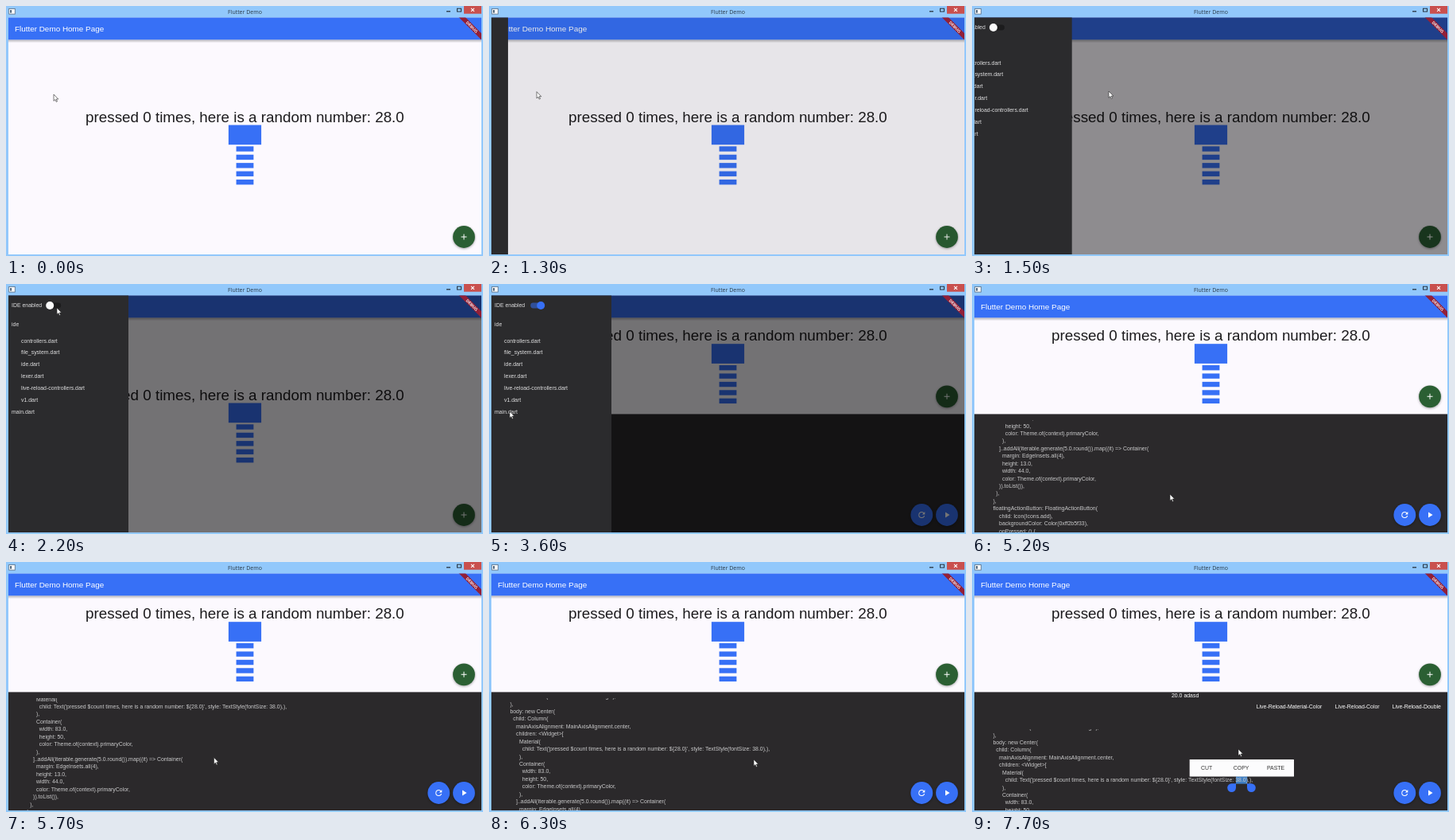
Recreate the animation shown at these times as an HTML page. Size 600 px wide and 314 px high, loop 8 s.

```html
<!DOCTYPE html>
<html lang="en">
<head>
<meta charset="utf-8">
<title>Flutter Demo</title>
<style>
  html, body { margin: 0; width: 100%; height: 100%; overflow: hidden; background: #92c8fb; }
  svg { display: block; width: 100%; height: 100%; }
  text { font: 6.93px "Liberation Sans", Arial, sans-serif; white-space: pre; }
  .code text { fill: #cacacb; }
  .drawer text { fill: #dededf; }
  .bar text { fill: #fff; }
  .menu text { fill: #333; }
  .fab { filter: drop-shadow(0 1.5px 1.5px rgba(0, 0, 0, .35)); }
</style>
</head>
<body>
<svg viewBox="0 0 600 314">
  <defs>
    <clipPath id="client"><rect x="3" y="14.5" width="595" height="297.5"/></clipPath>
    <clipPath id="editor"><rect id="editorView" x="3" y="171" width="595" height="141"/></clipPath>
    <linearGradient id="shade" x2="0" y2="1">
      <stop offset="0" stop-opacity=".28"/><stop offset="1" stop-opacity="0"/>
    </linearGradient>
  </defs>

  <rect width="600" height="314" fill="#92c8fb"/>
  <rect x="3.7" y="3.5" width="7.6" height="6.6" fill="#fff" stroke="#566b80" stroke-width=".8"/>
  <rect x="5" y="5" width="2.2" height="3.6" fill="#566b80"/>
  <text x="300.5" y="9.8" text-anchor="middle" fill="#2b3a48" style="font:7px 'Open Sans',sans-serif">Flutter Demo</text>
  <path d="M554 6.8h5" stroke="#26323e" stroke-width="1.3"/>
  <rect x="567.5" y="3.2" width="5" height="3.8" fill="none" stroke="#26323e"/>
  <rect x="576" width="22" height="9.7" fill="#c9504e"/>
  <path d="M585 2.8l4 4m0-4l-4 4" stroke="#fff" stroke-width="1.1"/>

  <g clip-path="url(#client)">
    <rect x="3" y="14" width="595" height="298" fill="#fcf9fe"/>
    <g id="content">
      <text x="100" y="145.6" fill="#1c1b1d" style="font-size:18.84px">pressed 0 times, here is a random number: 28.0</text>
      <g id="blocks" fill="#3770f6"><rect x="279.9" y="149.5" width="41.2" height="24.7"/></g>
    </g>
    <rect x="3" y="42.3" width="595" height="4" fill="url(#shade)"/>
    <rect x="3" y="14" width="595" height="28.3" fill="#3770f6"/>
    <text x="10.9" y="32.2" fill="#fff" style="font-size:9.92px">Flutter Demo Home Page</text>

    <g id="panel">
      <rect x="3" y="163.4" width="595" height="149" fill="#2b292b"/>
      <g id="bar" class="bar">
        <text x="251" y="170.3">20.0 adasd</text>
        <text x="357.7" y="183.8">Live-Reload-Material-Color</text>
        <text x="456.8" y="183.8">Live-Reload-Color</text>
        <text x="528.7" y="183.8">Live-Reload-Double</text>
      </g>
      <g id="highlight"><rect x="332" y="230.2" width="14.2" height="9.4" fill="#3f7fc4"/></g>
      <g clip-path="url(#editor)"><g id="code" class="code"></g></g>
      <g id="handles" fill="#3770f6">
        <path d="M332 239.2v5.4a5.4 5.4 0 1 1-5.4-5.4z"/>
        <path d="M346 239.2v5.4a5.4 5.4 0 1 0 5.4-5.4z"/>
      </g>
      <g id="menu" class="menu">
        <rect x="273.7" y="209" width="131.3" height="21.6" rx=".6" fill="#fcfcfd"/>
        <text x="288" y="222.3">CUT</text>
        <text x="328.8" y="222.3">COPY</text>
        <text x="371" y="222.3">PASTE</text>
      </g>
      <g id="tools"></g>
    </g>
    <g id="add"></g>

    <rect id="scrim" x="3" y="14" width="595" height="298"/>
    <g id="drawer" class="drawer">
      <rect x="3" y="14" width="151" height="298" fill="#2b2b2d"/>
      <text x="7" y="29.3">IDE enabled</text>
      <rect id="track" x="52.2" y="23.5" width="17" height="6.9" rx="3.45"/>
      <circle id="thumb" cy="27" r="5"/>
    </g>
    <g transform="translate(598 14.5) rotate(45)">
      <rect x="-22" y="13.9" width="44" height="5.95" fill="#922038"/>
      <text y="18.7" text-anchor="middle" fill="#fff" style="font-size:5.06px;font-weight:bold">DEBUG</text>
    </g>
  </g>
  <path id="cursor" d="M0 0v8.3l1.9-1.8 1.3 2.9 1.3-.6-1.3-2.8h2.6z" fill="#fff" stroke="#222" stroke-width=".6"/>
</svg>

<script>
const LOOP = 8000, STEP = 100, LINE = 9.43;
const $ = id => document.getElementById(id);

const source = `}

class MyHomePage extends StatefulWidget {
  MyHomePage({Key key}) : super(key: key);

  @override
  _MyHomePageState createState() => new _MyHomePageState();
}

class _MyHomePageState extends State<MyHomePage> {
  int count = 0;

  @override
  Widget build(BuildContext context) {
    return new Scaffold(
        appBar: new AppBar(
          title: new Text('Flutter Demo Home Page'),
        ),
        body: new Center(
          child: Column(
            mainAxisAlignment: MainAxisAlignment.center,
            children: <Widget>[
              Material(
                child: Text('pressed $count times, here is a random number: \${28.0}', style: TextStyle(fontSize: 38.0),),
              ),
              Container(
                width: 83.0,
                height: 50,
                color: Theme.of(context).primaryColor,
              ),
            ]..addAll(Iterable.generate(5.0.round()).map((it) => Container(
              margin: EdgeInsets.all(4),
              height: 13.0,
              width: 44.0,
              color: Theme.of(context).primaryColor,
            )).toList()),
          ),
        ),
        floatingActionButton: FloatingActionButton(
            child: Icon(Icons.add),
            backgroundColor: Color(0xff2b5f33),
            onPressed: () {
              setState(() {
                count++;
              });
            },
        ),
    );
  }
}`;

const files = ['ide', 'controllers.dart', 'file_system.dart', 'ide.dart', 'lexer.dart',
  'live-reload-controllers.dart', 'v1.dart', 'main.dart'];

const icons = {
  add: 'M19 13h-6v6h-2v-6H5v-2h6V5h2v6h6z',
  refresh: 'M17.65 6.35A7.96 7.96 0 0 0 12 4a8 8 0 1 0 7.73 10h-2.08A6 6 0 1 1 12 6c1.66 0 3.14.69 4.22 1.78L13 11h7V4z',
  play: 'M8 5v14l11-7z'
};

function make(parent, tag, attrs, text = '') {
  const el = document.createElementNS('http://www.w3.org/2000/svg', tag);
  for (const key in attrs) el.setAttribute(key, attrs[key]);
  el.textContent = text;
  return $(parent).appendChild(el);
}

function fab(parent, x, y, color, icon) {
  make(parent, 'circle', { cx: x, cy: y, r: 13.9, fill: color, class: 'fab' });
  make(parent, 'path', { d: icons[icon], fill: '#fff', transform: `translate(${x - 6} ${y - 6}) scale(.5)` });
}

for (let i = 0; i < 5; i++)
  make('blocks', 'rect', { x: 289.6, y: 176.3 + i * 10.42, width: 21.8, height: 6.4 });
source.split('\n').forEach((line, i) => make('code', 'text', { x: 11, y: 179.5 + i * LINE }, line));
files.forEach((name, i) => make('drawer', 'text', {
  x: i % 7 ? 19 : 7,
  y: i ? 73.6 + (i - 1) * 14.85 : 53.4
}, name));
fab('add', 576, 290, '#2b5f33', 'add');
fab('tools', 544.3, 290, '#3770f6', 'refresh');
fab('tools', 576, 290, '#3770f6', 'play');

// Each row: time, value(s); linear in between.
const tracks = {
  cursor: [[0, 60, 111], [200, 8, 109], [500, 8, 109], [700, 4, 108], [1200, 4, 108], [1500, 172, 107],
    [1600, 178, 98], [2100, 66, 29], [2200, 64, 30], [2800, 64, 30], [3400, 26, 160], [3700, 26, 160],
    [4000, 29, 159], [4400, 232, 288], [4800, 243, 205], [5200, 249, 264], [5400, 252, 212],
    [5900, 268, 268], [6200, 272, 256], [6300, 333, 248], [6400, 341, 241], [6700, 335, 235]],
  open: [[1200, 0], [1300, .15], [1400, .52], [1500, .815], [1600, .95], [1700, 1],
    [3600, 1], [3700, .8], [3800, .38], [3900, .08], [4000, 0]],
  toggle: [[2500, 0], [2800, 1]],
  scroll: [[4400, 0], [4800, 85], [5000, 200], [5200, 253.6], [5300, 261], [5400, 261], [5900, 180], [6200, 159.2]]
};

function at(track, t) {
  const next = track.findIndex(row => row[0] > t);
  if (next === 0) return track[0].slice(1);
  if (next < 0) return track[track.length - 1].slice(1);
  const a = track[next - 1], b = track[next], k = (t - a[0]) / (b[0] - a[0]);
  return a.slice(1).map((v, i) => v + (b[i + 1] - v) * k);
}

const move = (id, x, y) => $(id).setAttribute('transform', `translate(${x} ${y})`);
const show = (id, on) => { $(id).style.display = on ? '' : 'none'; };

function render(t) {
  const [open] = at(tracks.open, t), [toggle] = at(tracks.toggle, t);
  const ide = t >= 2700, selected = t >= 7000, edited = t >= 7600;
  const lift = ide ? -74.3 : 0, push = edited ? 39 : 0;

  move('cursor', ...at(tracks.cursor, t));
  move('content', 0, lift);
  move('add', 0, ide ? -148.7 : 0);
  move('drawer', (open - 1) * 153, 0);
  show('drawer', open > 0);
  $('scrim').setAttribute('opacity', open * .54);

  $('thumb').setAttribute('cx', 55.2 + toggle * 10);
  $('thumb').setAttribute('fill', toggle > .5 ? '#3770f6' : '#fafafa');
  $('track').setAttribute('fill', toggle > .5 ? '#30509a' : '#1c1c1d');

  show('panel', ide);
  show('code', t >= 3700);
  show('bar', edited);
  move('code', 0, push - at(tracks.scroll, t)[0]);
  $('editorView').setAttribute('y', 171 + push);
  for (const id of ['highlight', 'handles', 'menu']) {
    show(id, selected);
    move(id, 0, push);
  }
}

const start = performance.now();
function tick() {
  const t = (performance.now() - start) % LOOP;
  render(Math.floor(t / STEP) * STEP);
  requestAnimationFrame(tick);
}
tick();
</script>
</body>
</html>
```
